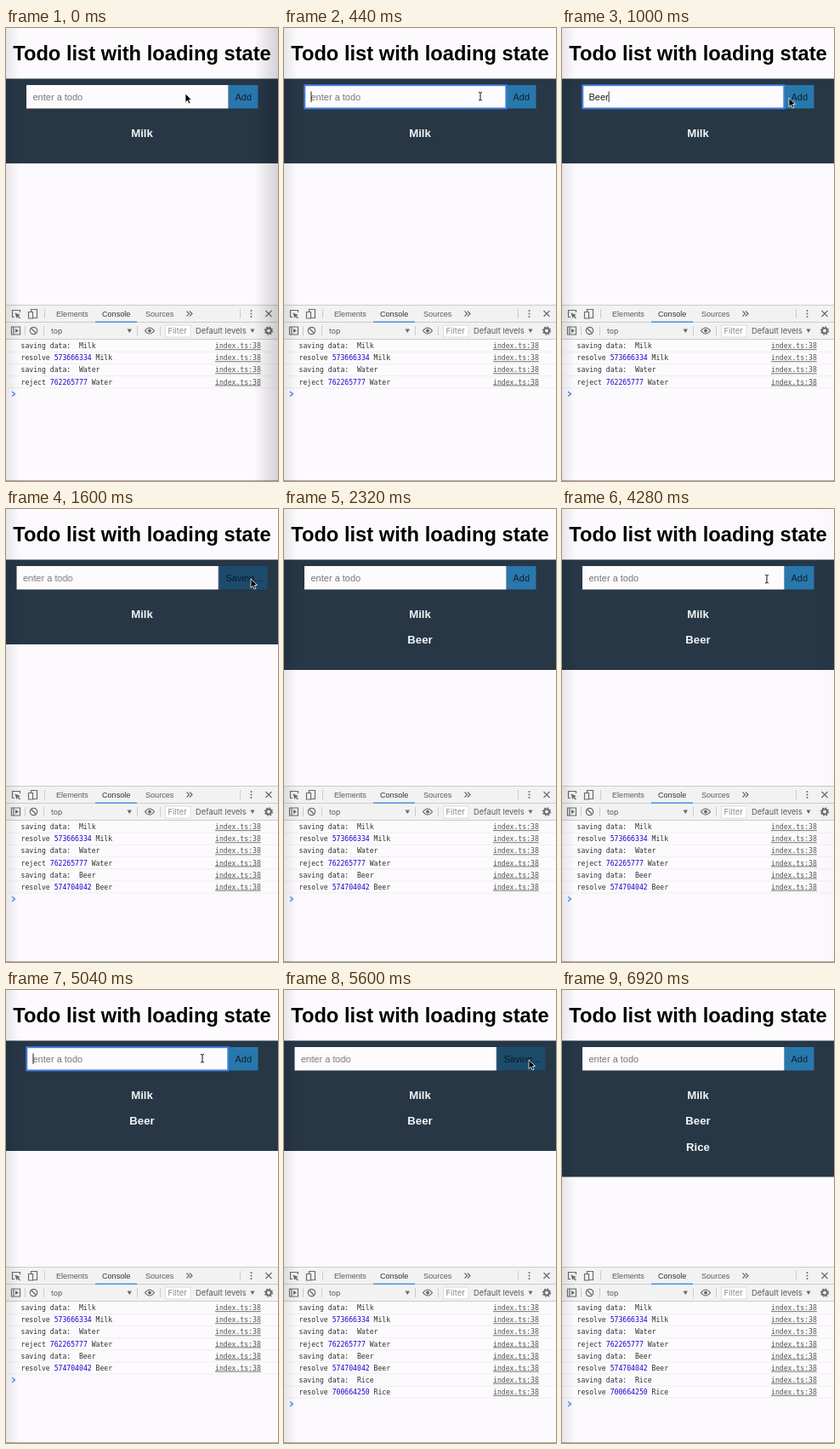
These frames come from a looping animation (320 px wide and 532 px high, 6.96 s). An HTML page:

```html
<!DOCTYPE html>
<html lang="en">
<head>
<meta charset="utf-8">
<title>Todo list with loading state</title>
<style>
  html, body { margin: 0; width: 100%; height: 100%; overflow: hidden; background: #fcfafc; }
  svg { display: block; width: 100%; height: 100%; }
  text { font-family: "Liberation Sans", Arial, sans-serif; font-size: 11px; white-space: pre; }
  .title { font-size: 23.7px; font-weight: bold; text-anchor: middle; }
  .item { font-size: 13.2px; font-weight: bold; text-anchor: middle; fill: #f3f5f6; }
  .tabs text { font-size: 9.1px; fill: #5a5a5a; }
  .bar text { font-family: Inter, sans-serif; font-size: 9.4px; fill: #5a5a5a; }
  .log text { font-family: "DejaVu Sans Mono", monospace; font-size: 8.13px; fill: #303030; }
  .log .num { fill: #1c00cf; }
  .log .src { text-decoration: underline; fill: #545454; }
  .icon { fill: none; stroke: #6a6a6a; stroke-width: 1.2; }
  .solid { fill: #6a6a6a; }

  /* one loop; .step jumps between keys, .ease glides */
  .step { animation: 6.96s step-end infinite; }
  .ease { animation: 6.96s ease-in-out infinite; }

  @keyframes idle { 0% { opacity: 1 } 16.09% { opacity: 0 } 26.43% { opacity: 1 } 78.16% { opacity: 0 } 87.35% { opacity: 1 } }
  @keyframes saving { 0% { opacity: 0 } 16.09% { opacity: 1 } 26.43% { opacity: 0 } 78.16% { opacity: 1 } 87.35% { opacity: 0 } }
  @keyframes shift {
    0% { transform: translateX(0) } 16.09% { transform: translateX(-11.5px) } 26.43% { transform: translateX(0) }
    78.16% { transform: translateX(-11.5px) } 87.35% { transform: translateX(0) }
  }
  @keyframes focus { 0% { opacity: 0 } 4.59% { opacity: 1 } 16.09% { opacity: 0 } 67.81% { opacity: 1 } 78.16% { opacity: 0 } }
  @keyframes hint { 0% { opacity: 1 } 10.34% { opacity: 0 } 16.09% { opacity: 1 } 72.98% { opacity: 0 } 78.16% { opacity: 1 } }
  @keyframes first { 0% { opacity: 1 } 30% { opacity: 0 } }
  @keyframes second { 0% { opacity: 0 } 30% { opacity: 1 } }
  @keyframes type {
    0% { transform: translateX(0) }
    10.34% { transform: translateX(7.3px) } 11.49% { transform: translateX(13.5px) }
    12.64% { transform: translateX(19.6px) } 13.79% { transform: translateX(23.2px) }
    16.09% { transform: translateX(0) }
    72.98% { transform: translateX(7.9px) } 74.13% { transform: translateX(10.4px) }
    75.28% { transform: translateX(15.9px) } 76.43% { transform: translateX(22px) }
    78.16% { transform: translateX(0) }
  }

  @keyframes beer { 0% { opacity: 0 } 26.43% { opacity: 1 } }
  @keyframes rice { 0% { opacity: 0 } 87.35% { opacity: 1 } }
  @keyframes saveBeer { 0% { opacity: 0 } 16.09% { opacity: 1 } }
  @keyframes gotBeer { 0% { opacity: 0 } 19.53% { opacity: 1 } }
  @keyframes saveRice { 0% { opacity: 0 } 78.16% { opacity: 1 } }
  @keyframes gotRice { 0% { opacity: 0 } 79.88% { opacity: 1 } }
  @keyframes prompt {
    0% { transform: translateY(0) } 16.09% { transform: translateY(14.1px) } 19.53% { transform: translateY(28.2px) }
    78.16% { transform: translateY(42.3px) } 79.88% { transform: translateY(56.4px) }
  }

  @keyframes shade {
    0%, .57% { opacity: 1 } 5%, 41.38% { opacity: 0 } 43.1%, 57.47% { opacity: 1 } 62.64%, 100% { opacity: 0 }
  }
  @keyframes mouse {
    0%, .57% { transform: translate(211px, 77px) }
    4.6%, 10.92% { transform: translate(231px, 80px) }
    14.37%, 15.5% { transform: translate(267px, 82px) }
    19.54%, 26.43% { transform: translate(288px, 82px) }
    33.3%, 57.47% { transform: translate(332px, 100px) }
    62.64%, 74.14% { transform: translate(231px, 80px) }
    77.58% { transform: translate(267px, 82px) }
    80.4%, 87.35% { transform: translate(288px, 82px) }
    92.5%, 100% { transform: translate(332px, 100px) }
  }
  @keyframes arrow { 0% { opacity: 1 } 1.72% { opacity: 0 } 13.5% { opacity: 1 } 60.3% { opacity: 0 } 76.7% { opacity: 1 } }
  @keyframes beam { 0% { opacity: 0 } 1.72% { opacity: 1 } 13.5% { opacity: 0 } 60.3% { opacity: 1 } 76.7% { opacity: 0 } }
</style>
</head>
<body>
<svg viewBox="0 0 320 532">
  <defs>
    <linearGradient id="left"><stop stop-opacity=".08"/><stop offset="1" stop-opacity="0"/></linearGradient>
    <linearGradient id="right"><stop stop-opacity="0"/><stop offset="1" stop-opacity=".16"/></linearGradient>
  </defs>
  <rect width="320" height="532" fill="#fcfafc"/>
  <text class="title" x="160" y="38">Todo list with loading state</text>

  <g fill="#273746">
    <rect y="59.5" width="320" height="99.5"/>
    <rect class="step" style="animation-name:beer" y="158" width="320" height="31"/>
    <rect class="step" style="animation-name:rice" y="188" width="320" height="31.5"/>
  </g>
  <text class="item" x="160" y="128">Milk</text>
  <text class="item step" style="animation-name:beer" x="160" y="158">Beer</text>
  <text class="item step" style="animation-name:rice" x="160" y="188.5">Rice</text>

  <g class="step" style="animation-name:shift">
    <rect x="24" y="67" width="237.5" height="27.5" fill="#fdfbfd"/>
    <g class="step" style="animation-name:focus">
      <text class="step" style="animation-name:first" x="31.5" y="84.7" fill="#222">Beer</text>
      <text class="step" style="animation-name:second" x="31.5" y="84.7" fill="#222">Rice</text>
    </g>
    <rect class="step" style="animation-name:type" x="31.5" y="72" width="40" height="18" fill="#fdfbfd"/>
    <text class="step" style="animation-name:hint" x="31.5" y="84.7" fill="#777">enter a todo</text>
    <g class="step" style="animation-name:focus">
      <rect class="step" style="animation-name:type" x="31.5" y="74.5" width="1" height="12.5" fill="#222"/>
      <rect x="24.3" y="67.2" width="237" height="27.2" fill="none" stroke="#477fe0" stroke-width="2"/>
    </g>
  </g>
  <g class="step" style="animation-name:idle">
    <rect x="262" y="67" width="34.5" height="27.5" fill="#2878ad"/>
    <text x="269.5" y="84.7" fill="#10202c">Add</text>
  </g>
  <g class="step" style="animation-name:saving">
    <rect x="250.5" y="67" width="57" height="27.5" fill="#1c4b6c"/>
    <text x="258.5" y="84.7" fill="#0b1c29">Saving...</text>
  </g>

  <rect y="325" width="320" height="41" fill="#f3f2f3"/>
  <path d="M0 325.5H320M0 345.5H320M0 365.5H320M45.5 330V341M22.5 350V361M44.5 350V361M154.5 350V361M181.5 350V361M275.5 330V341" stroke="#ccc" fill="none"/>
  <g class="tabs">
    <path class="icon" d="M10 339.5H7.500V331.500H16.500V334"/>
    <path class="solid" d="M10.500 334.500L17 337L14.500 338L17 340.500L16 341.500L13.500 339L12.500 341Z"/>
    <path class="icon" d="M29.500 333V330.500H36.500V340.500H32M26.500 333.500H31.500V341H26.500Z"/>
    <text x="59" y="339">Elements</text>
    <text x="113" y="339" style="fill:#333">Console</text>
    <text x="164" y="339">Sources</text>
    <path class="icon" d="M212.500 332.500L215.500 335.500L212.500 338.500M216 332.500L219 335.500L216 338.500"/>
    <g class="solid"><circle cx="288.500" cy="332" r="1"/><circle cx="288.500" cy="335.500" r="1"/><circle cx="288.500" cy="339" r="1"/></g>
    <path class="icon" d="M305.500 332L312.500 339M312.500 332L305.500 339"/>
    <rect x="105" y="344.500" width="49" height="1.500" fill="#4a90d9"/>
  </g>
  <g class="bar">
    <path class="icon" d="M6.500 351H16.500V360H6.500ZM9 351V360"/>
    <path class="solid" d="M11 353L15 355.500L11 358Z"/>
    <circle class="icon" cx="32.500" cy="355.500" r="4.200"/>
    <path class="icon" d="M29.500 352.500L35.500 358.500"/>
    <text x="53" y="358.800" style="font-size:8.700px">top</text>
    <path class="solid" d="M142.500 353.500H148L145.250 358Z"/>
    <path class="icon" d="M163.500 355.500Q169 348.500 174.500 355.500Q169 362.500 163.500 355.500Z"/>
    <circle class="solid" cx="169" cy="355.500" r="2"/>
    <rect x="187.500" y="349" width="29.500" height="14" fill="#fff" stroke="#ddd"/>
    <text x="190.500" y="359" style="fill:#888">Filter</text>
    <text x="223" y="359">Default levels</text>
    <path class="solid" d="M287.500 353.500H292.500L290 358Z"/>
    <circle class="icon" cx="309" cy="355.500" r="3" style="stroke-width:2"/>
    <circle class="icon" cx="309" cy="355.500" r="4.600" style="stroke-dasharray:1.800 1.813"/>
  </g>

  <g class="log" id="log"></g>
  <path class="step" style="animation-name:prompt" d="M7 427L10.500 429.700L7 432.400" fill="none" stroke="#4285f4" stroke-width="1.300"/>
  <rect y="531" width="320" height="1" fill="#aaa"/>

  <rect width="16" height="532" fill="url(#left)"/>
  <rect class="ease" style="animation-name:shade" x="292" width="28" height="532" fill="url(#right)"/>

  <g class="ease" style="animation-name:mouse">
    <path class="step" style="animation-name:arrow" d="M0 0V10.500L2.500 8.200L4.200 12L6 11.200L4.400 7.500H7.600Z" stroke="#fff" stroke-width=".8"/>
    <path class="step" style="animation-name:beam" d="M-2 -4.500Q0 -4.500 0 -3.500Q0 -4.500 2 -4.500M0 -3.500V4M-2 5Q0 5 0 4Q0 5 2 5" fill="none" stroke="#111"/>
  </g>
</svg>
<script>
  const rows = [
    ["saving data:  Milk"],
    ["resolve <573666334> Milk"],
    ["saving data:  Water"],
    ["reject <762265777> Water"],
    ["saving data:  Beer", "saveBeer"],
    ["resolve <574704042> Beer", "gotBeer"],
    ["saving data:  Rice", "saveRice"],
    ["resolve <700664250> Rice", "gotRice"]
  ];
  document.getElementById("log").innerHTML = rows.map(([line, reveal], i) => {
    const y = 376.3 + i * 14.08;
    const html = line.replace(/<(\d+)>/, '<tspan class="num">$1</tspan>');
    const anim = reveal ? ` class="step" style="animation-name:${reveal}"` : "";
    return `<g${anim}>
      <path d="M0 ${y + 4.2}H320" stroke="#f0eef0"/>
      <text x="17.5" y="${y}">${html}</text>
      <text class="src" x="246" y="${y}">index.ts:38</text>
    </g>`;
  }).join("");
</script>
</body>
</html>
```
